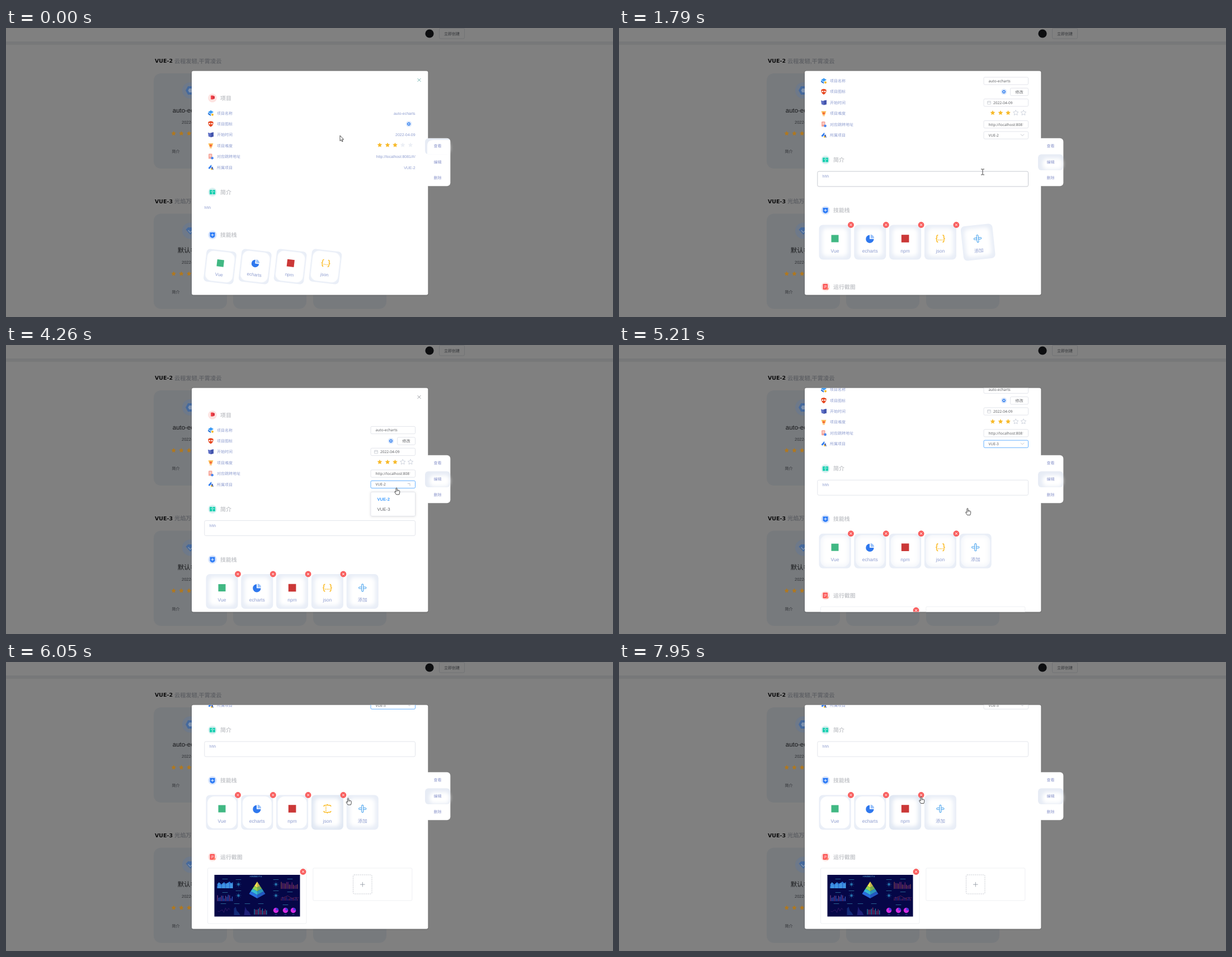
Write an HTML page that moves like this. It is 1085 px wide and 516 px high and loops after 8 s.

```html
<!DOCTYPE html>
<html lang="zh">
<head>
<meta charset="utf-8">
<title>项目详情</title>
<style>
html, body { margin: 0; width: 100%; height: 100%; overflow: hidden; background: #808080; }
svg { display: block; width: 1085px; height: 516px; }
text { font-family: "Liberation Sans", "Noto Sans CJK SC", sans-serif; text-rendering: geometricPrecision; white-space: pre; }
.ui { font-family: "Noto Sans", "Noto Sans CJK SC", sans-serif; }
.bold { font-weight: bold; }
.wide { font-family: "DejaVu Sans", "Noto Sans CJK SC", sans-serif; font-weight: bold; }
</style>
</head>
<body>
<svg id="stage" viewBox="0 0 1085 516"></svg>
<script>
const BLUE = '#8d9ccf', GOLD = '#f7ba2a', LINE = '#dcdfe6', GREY = '#606266', FOCUS = '#409eff';
const ROWS = [152, 171.3, 190.8, 210, 229.6, 249];
const STARS = [668, 682, 695.5, 709.2, 723];

// Drawing helpers
const rect = (x, y, w, h, fill, r = 0, more = '') =>
  `<rect x="${x}" y="${y}" width="${w}" height="${h}" rx="${r}" fill="${fill}" ${more}/>`;
const frame = (x, y, w, h, r = 2, more = '') => rect(x, y, w, h, '#fff', r, `stroke="${LINE}" stroke-width=".8" ${more}`);
const disc = (x, y, r, fill) => `<circle cx="${x}" cy="${y}" r="${r}" fill="${fill}"/>`;
const path = (d, fill, more = '') => `<path d="${d}" fill="${fill}" ${more}/>`;
const line = (d, color, w = 1, more = '') => path(d, 'none', `stroke="${color}" stroke-width="${w}" ${more}`);
const text = (x, y, str, size, fill, more = '') =>
  `<text x="${x}" y="${y + size * .37}" font-size="${size}" fill="${fill}" ${more}>${str}</text>`;
const group = (body, more = '') => `<g ${more}>${body}</g>`;
const at = (x, y, body) => group(body, `transform="translate(${x} ${y})"`);
const MID = 'text-anchor="middle"', END = 'text-anchor="end"';

function star(x, y, r, fill, more = '') {
  const pts = Array.from({ length: 10 }, (_, i) => {
    const a = i * Math.PI / 5, q = i % 2 ? r * .48 : r;
    return `${(x + q * Math.sin(a)).toFixed(2)},${(y - q * Math.cos(a)).toFixed(2)}`;
  });
  return `<polygon points="${pts.join(' ')}" fill="${fill}" stroke-linejoin="round" ${more}/>`;
}
const badge = (x, y) => disc(x, y, 5.4, '#f95d5d') +
  line(`M${x - 2} ${y - 2}l4 4m0-4l-4 4`, '#fff', 1);
const hexagon = (r, fill) => path(`M${-r} 0L${-r / 2} ${-r * .87}H${r / 2}L${r} 0L${r / 2} ${r * .87}H${-r / 2}Z`, fill);

// Dimmed page behind the dialog
function pageCard(x, y, title, icon) {
  let s = rect(x, y, 131, 170, '#777a7d', 13);
  if (!title) return s;
  s += disc(x + 65.5, y + 30.5, 14.5, '#6e7989') + at(x + 65.5, y + 30.5, icon);
  s += text(x + 65.5, y + 65.5, title, 11.4, '#17181a', MID);
  s += text(x + 50, y + 87, '2022-04-09', 7.5, '#303236');
  for (let i = 0; i < 5; i++) s += star(x + 35.7 + i * 13.7, y + 107.3, 4.5, i < 3 ? '#b0781f' : '#75777a');
  return s + text(x + 32.5, y + 139.5, '简介', 7, '#303236');
}
function page() {
  const gem = path('M-8 -2L-4 -6H4L8 -2L0 7Z', '#45699c') + line('M-4 -1L0 3L4 -1', '#8797ac', 1.3);
  const cube = hexagon(8.5, '#45699c') + hexagon(4, '#7f92ad');
  return rect(0, 0, 1085, 516, '#808080') + rect(0, 24, 1085, 6, '#777879') +
    disc(757, 10, 7.6, '#0d0e10') +
    rect(774.5, .5, 45, 18.5, '#808080', 2, 'stroke="#6e7073" stroke-width=".8"') +
    text(797, 10.2, '立即创建', 7, '#303236', MID) +
    text(266, 58.8, 'VUE-2', 9.5, '#0c0c0d', 'class="wide"') +
    text(301, 58.8, '云程发轫,干霄凌云', 10.2, '#606266', 'class="bold"') +
    text(266, 309.2, 'VUE-3', 9.5, '#0c0c0d', 'class="wide"') +
    text(301, 309.2, '光焰万丈', 10.2, '#606266', 'class="bold"') +
    pageCard(264, 81, 'auto-echarts', cube) + pageCard(264, 331.5, '默认名称', gem) +
    pageCard(406, 331.5) + pageCard(549, 331.5);
}

// Dialog parts
const head = (y, label, tint, icon) => disc(369, y, 7.8, tint) + at(369, y, icon) +
  text(383, y, label, 9.9, '#c6c8cc', 'class="bold"');
const heads = {
  project: rect(-3, -4.5, 5, 7, '#f5484e', 1) + rect(0, -3.5, 4, 5, '#d9333f', .8),
  intro: rect(-5, -4, 10, 8, '#18cfb0', 1) + line('M0 -4V4M-3 -1H-1.5M1.5 -1H3.5', '#fff', .8),
  skill: path('M-4.5 -4.5H4.5V2.5Q3 5 0 5.4Q-3 5 -4.5 2.5Z', '#2f7df6') + line('M-2.5 0H2.5M0 -2.5V2.5', '#fff', .9),
  shots: rect(-4.5, -5, 8.5, 10, '#fb4f4f', 1.2) + line('M-2.5 -2H2.5M-2.5 0H2.5M-2.5 2H0', '#fff', .8) + disc(3.5, 3.5, 2, '#ff8a70')
};
const rowIcons = [
  path('M-5 -1.5L0 -5L5 -2L0 1.2Z', '#3f9df5') + path('M-5 -.5L0 2.2V5L-5 1.8Z', '#2272d8') + disc(3, 2.8, 2, GOLD),
  path('M-4.5 -3.5Q0 -6.5 4.5 -3.5Q5.5 2 0 5.3Q-5.5 2 -4.5 -3.5Z', '#e6461f') + disc(-2, -.5, 1.4, '#fff') + disc(2, -.5, 1.4, '#fff'),
  path('M-5 -4L-1 -3L0 -3.6L5 -4.5V3L0 4.2L-4 3Z', '#5f70c5') + path('M0 -3.6L5 -4.5V3L0 4.2Z', '#4556ad'),
  path('M-4.5 -4H4.5L2.5 1H-2.5Z', '#fbc15e') + disc(0, -.2, 3, '#fda64a') + path('M0 -2L1.5 0L0 2L-1.5 0Z', '#ee4b3e') + rect(-2, 3, 4, 1.8, '#f9c97c'),
  rect(-4, -5, 6.5, 9, '#f6a79b', 1.2) + line('M-2.5 -2.5H1M-2.5 -.5H1', '#fff', .8) + disc(2.6, 2.6, 2.3, '#4a87ee'),
  path('M-4.5 1L1 -5L1.5 -1.5L-2.5 3Z', '#2f7df0') + path('M0 1L3.5 -1.5L4.8 4.5L2 3Z', '#3d5fb8') + disc(1.5, 3, 1.4, GOLD)
];
const labels = ['项目名称', '项目图标', '开始时间', '项目难度', '对应跳转地址', '所属项目'];
const chip = x => at(x, 171.3, disc(0, 0, 5.3, '#dbe8fc') + hexagon(3.3, '#4a8ef0') + disc(0, 0, 1.1, '#fff'));

function viewPart() {
  const values = { 0: 'auto-echarts', 2: '2022-04-09', 4: 'http://localhost:8081/#/', 5: 'VUE-2' };
  let s = chip(720);
  for (const i in values) s += text(731.6, ROWS[i], values[i], 6.95, BLUE, END);
  STARS.forEach((x, i) => s += star(x, 209, 4.6, i < 3 ? GOLD : '#eceff5'));
  return s + text(354.5, 320, 'hhh', 7, BLUE) + head(369.5, '技能栈', '#dbe7fd', heads.skill);
}
function editPart() {
  const field = (y, str, x = 660.5) => text(x, y, str, 6.6, GREY, 'class="ui"');
  let s = [0, 2, 4].map(i => frame(652, ROWS[i] - 6.6, 79.5, 13.2)).join('');
  s += frame(652, 242.4, 79.5, 13.2, 2, 'id="select"');
  s += field(152, 'auto-echarts') + field(190.8, '2022-04-09', 669);
  s += group(field(229.6, 'http://localhost:8081/#/'), 'clip-path="url(#url)"');
  s += text(660.5, 249, 'VUE-2', 6.6, GREY, 'class="ui" id="choice"');
  s += line('M-3 -1.5L0 1.5L3 -1.5', '#b4b8c0', .8, 'id="chevron"');
  s += rect(658.5, 188.3, 6, 5.4, 'none', .5, 'stroke="#c0c4cc" stroke-width=".7"') + line('M658.5 190.3h6M660 187.5v1.6M663 187.5v1.6', '#c0c4cc', .7);
  s += chip(688) + frame(699.5, 164.8, 32, 13.4) + text(715.5, 171.6, '修改', 7, GREY, MID);
  STARS.forEach((x, i) => s += star(x, 209, i < 3 ? 4.6 : 4.9, i < 3 ? GOLD : '#fff',
    i < 3 ? '' : `stroke="#c3cad6" stroke-width=".8" id="star${i}"`));
  s += frame(354.8, 313.5, 376.7, 27, 2.5, 'id="area"') + text(363.5, 322, 'hhh', 7, BLUE);
  s += head(383, '技能栈', '#dbe7fd', heads.skill) + head(519.5, '运行截图', '#fde3e1', heads.shots);
  s += frame(360.5, 539.5, 176.5, 99, 2, 'stroke-opacity=".6"') + at(372.5, 551.5, dashboard()) + badge(531, 546);
  s += frame(548.8, 539.5, 177, 58, 2, 'stroke-opacity=".6"');
  s += frame(620.5, 551.5, 33.5, 34, 2, 'style="stroke:#b9bdc6" stroke-dasharray="2 1.4"');
  return s + line('M633 568.7h8.6M637.3 564.4v8.6', '#8c939d', .8);
}

// Layered pyramid: each band has a left and a right face
function pyramid(x, y) {
  const bands = [['#f3e04c', 0, .36], ['#8fd655', .36, .58], ['#36b9d6', .58, .8], ['#2a6ee0', .8, 1]];
  const face = (dir, a, b) => `M${dir * 14.5 * a} ${22 * a}L0 ${30 * a}V${30 * b}L${dir * 14.5 * b} ${22 * b}Z`;
  return at(x, y, bands.map(([c, a, b]) => path(face(-1, a, b), c) + path(face(1, a, b), c, 'opacity=".8"')).join(''));
}

// Small dark chart wall inside the screenshot frame
function dashboard() {
  let seed = 7;
  const rnd = () => (seed = seed * 16807 % 2147483647) / 2147483647;
  const bars = (x, y, n, h, a, b) => Array.from({ length: n }, (_, i) => {
    const v = h * (.35 + .65 * rnd());
    return rect(x + i * 2.4, y - v, 1.2, v, i % 3 ? a : b);
  }).join('');
  const wave = (x, y, w, h, c) => line('M' + Array.from({ length: 9 }, (_, i) => `${x + i * w / 8} ${y - h * rnd()}`).join('L'), c, .5);
  const burst = (x, y) => at(x, y, line('M-5 0H5M0 -5V5M-3.5 -3.5L3.5 3.5M3.5 -3.5L-3.5 3.5', '#1d5596', .6) + disc(0, 0, 2.2, '#2470aa'));
  let s = rect(0, 0, 153, 74.5, '#050747');
  s += text(74, 3, '大数据展示平台', 3.2, '#5fb4e8', MID);
  s += path('M5 24V16L9 14L13 17L17 13L21 16L27 12L30 15L33 13V24Z', '#2a72d4') + bars(5, 24, 12, 11, '#58b4ee', '#3a8ce0');
  s += bars(5, 47, 12, 12, '#3558c0', '#7a4488');
  s += bars(119, 25, 13, 13, '#70286c', '#8a4850') + bars(119, 46, 13, 7, '#352680', '#6a224e') + wave(119, 43, 32, 6, '#a83458');
  for (const x of [43, 110]) s += burst(x, 17) + burst(x, 37);
  s += pyramid(76.5, 12);
  s += wave(6, 70, 22, 12, '#54287c') + path('M35 72V60L38 57L40 64L44 68L46 72Z', '#122a78') + path('M53 72L55 57L58 63L62 66L65 72Z', '#1e2078');
  s += bars(71, 71, 10, 13, '#933560', '#2f8cb0');
  for (const x of [110, 127, 141]) s += disc(x, 63.5, 4.7, '#d52be0') + path(`M${x} 63.5V58.8A4.7 4.7 0 0 1 ${x + 4.7} 63.5Z`, '#4737e0') + rect(x - 2, 70.5, 4, .7, '#3f6fb5');
  for (const [x, y] of [[19, 7], [43, 8], [110, 8], [135, 7], [19, 31], [43, 28], [110, 28], [135, 30], [16, 51], [40, 51], [59, 51], [83, 51], [127, 53]])
    s += rect(x - 5, y, 10, .9, '#27608f', .4);
  return s;
}

// Skill tiles
const skills = [
  ['Vue', rect(-6.5, -6.5, 13, 13, '#41b883')],
  ['echarts', path('M-.8 -6.5V.8H6.8A7.2 7.2 0 1 1 -.8 -6.5Z', '#2f78ee') + path('M.8 -7.3A7 7 0 0 1 7.3 -.8H.8Z', '#9cc3fa')],
  ['npm', rect(-6.8, -6.8, 13.6, 13.6, '#cb3837')],
  ['json', line('M-4 -6.3Q-6.3 -6.3 -6.3 -4V-2Q-6.3 0 -8.3 0Q-6.3 0 -6.3 2V4Q-6.3 6.3 -4 6.3M4 -6.3Q6.3 -6.3 6.3 -4V-2Q6.3 0 8.3 0Q6.3 0 6.3 2V4Q6.3 6.3 4 6.3', '#fbbd2b', 1.6) +
    [-3, 0, 3].map(x => disc(x, 2.5, .9, '#fbbd2b')).join('')],
  ['添加', line('M-1.5 -1.5V-5Q-1.5 -6.6 0 -6.6T1.5 -5V5Q1.5 6.6 0 6.6T-1.5 5V-1.5H-5Q-6.6 -1.5 -6.6 0T-5 1.5H-1.5M1.5 -1.5H5Q6.6 -1.5 6.6 0T5 1.5H1.5', '#4fa6ee', 1.1)]
];
const inset = (x, y, w, h) => rect(x + 5.8, y + 5.8, w - 11.6, h - 11.6, '#fff', 8, 'filter="url(#soft)" class="soft"') +
  rect(x + 2.6, y + 2.6, w - 5.2, h - 5.2, '#fff', 12, 'filter="url(#crisp)" class="crisp"');
const tile = ([name, icon], i) => group(
  rect(-28.5, -31, 57, 62, '#e9eef7', 7, 'class="base"') + inset(-28.5, -31, 57, 62) +
  at(0, -6.5, group(icon, 'class="icon"')) + text(0, 15, name, 8.5, BLUE, MID) +
  (i < 4 ? group(badge(28.5, -31), 'class="badge"') : ''), `id="tile${i}"`);

const menu = () => rect(749, 196.8, 45.3, 85.4, '#fff', 6) +
  group(rect(749, 197, 45, 28.5, '#e7ecf5', 6) +
    rect(757, 204, 36, 20, '#fff', 8, 'filter="url(#soft)" class="soft"') +
    path('M753 225.5V211Q753 200 764 200H794V225.5Z', '#fff', 'filter="url(#crisp)" class="crisp"'), 'id="active"') +
  ['查看', '编辑', '删除'].map((s, i) => text(771.5, 210.8 + i * 28.5, s, 7, '#8a95cb', MID)).join('');

const dropdown = () => frame(652, 262.5, 79.5, 43, 2, 'filter="url(#drop)"') +
  text(663.5, 274.8, 'VUE-2', 7.6, FOCUS, 'class="bold"') + text(663.5, 292.8, 'VUE-3', 7.8, GREY);

const ink = 'stroke="#222" stroke-width=".8" stroke-linejoin="round"';
const cursors = {
  arrow: path('M0 0V9.6L2.2 7.6L3.7 10.9L5.2 10.2L3.8 7H6.6Z', '#fff', ink),
  hand: path('M-1 1.2Q0 -.6 1 1.2V4.6Q2 3.9 3 4.9Q4 4.4 4.6 5.5Q5.6 5.3 5.7 6.6V9.5L4.8 12.5H-.4L-3.2 8.4Q-3.4 6.6 -2.2 7L-1 8.2Z', '#fff', ink) + line('M1 4.6V7M3 5V7', '#222', .6),
  beam: line('M-3 -5H-.8L0 -4.4L.8 -5H3M0 -4.4V4.4M-3 5H-.8L0 4.4L.8 5H3', '#333', .9)
};

const blur = (id, d) => `<filter id="${id}" x="-40%" y="-40%" width="180%" height="180%"><feGaussianBlur stdDeviation="${d}"/></filter>`;
const shadow = (id, d, o) => `<filter id="${id}" x="-20%" y="-20%" width="140%" height="140%"><feDropShadow dx="0" dy=".5" stdDeviation="${d}" flood-opacity="${o}"/></filter>`;

document.getElementById('stage').innerHTML =
  `<defs>${blur('soft', 3.2)}${blur('crisp', .6)}${shadow('drop', 2, .12)}${shadow('lift', .8, .25)}
  <clipPath id="dialog">${rect(332, 76.8, 422.3, 399.6, '#fff', 3)}</clipPath>
  <clipPath id="url">${rect(653, 222, 69.3, 15, '#fff')}</clipPath></defs>` +
  page() + rect(332, 76.8, 422.3, 399.6, '#fff', 3, 'filter="url(#lift)"') +
  group(group(
    line('M735.6 90l5.8 5.8m0-5.8l-5.8 5.8', '#909399', .9, 'id="close"') +
    head(125, '项目', '#fde3e1', heads.project) +
    ROWS.map((y, i) => at(366, y, rowIcons[i]) + text(377, y, labels[i], 7, BLUE)).join('') +
    head(293, '简介', '#d8f1f1', heads.intro) +
    group(viewPart(), 'id="view"') + group(editPart(), 'id="edit"') +
    skills.map(tile).join('') + group(dropdown(), 'id="dropdown"'),
    'id="scroll"'), 'clip-path="url(#dialog)"') +
  menu() + group(Object.entries(cursors).map(([k, s]) => group(s, `id="${k}"`)).join(''), 'id="cursor"');

// Motion
const el = id => document.getElementById(id);
const set = (node, name, value) => node.setAttribute(name, value);
const show = (node, on) => { node.style.display = on ? '' : 'none'; };

function key(t, keys) {
  if (t <= keys[0][0]) return keys[0].slice(1);
  const n = keys.findIndex(k => k[0] > t);
  if (n < 0) return keys[keys.length - 1].slice(1);
  const a = keys[n - 1], b = keys[n], p = (t - a[0]) / (b[0] - a[0]);
  return a.slice(1).map((v, i) => v + (b[i + 1] - v) * p);
}

// Bursts of evenly spaced picture changes: first, last, count
const bursts = [[0, 120, 2], [430, 1110, 6], [1400, 1790, 4], [1910, 2300, 3], [2450, 2450, 1], [2730, 3010, 3],
  [3160, 3710, 5], [3840, 4260, 4], [4410, 4670, 3], [4970, 5460, 5], [5590, 5900, 3], [6050, 6050, 1], [6200, 7050, 7], [7170, 7950, 6]];
const ticks = bursts.flatMap(([a, b, n]) => Array.from({ length: n }, (_, i) => n > 1 ? Math.round(a + (b - a) * i / (n - 1)) : a));
const snap = t => ticks.filter(k => k <= t).pop();

const scrollKeys = [[1400, 0], [1660, 42], [1790, 57.5], [1910, 57.5], [2300, 0], [4670, 0], [5460, 135], [5900, 171.5]];
const pointer = [[0, 597, 192], [120, 650, 215], [430, 680, 226], [838, 755, 236], [1110, 769, 240], [1400, 769, 240],
  [1660, 680, 252], [1790, 650, 257], [1910, 649, 290], [2300, 648, 427], [2450, 724, 151], [2730, 704, 180], [2870, 709, 208],
  [3010, 743, 212], [3160, 769, 230], [3300, 766, 236], [3710, 704, 250], [4260, 698, 254.5], [4533, 688, 290], [4670, 688, 290],
  [4970, 640, 291], [5460, 572, 291.5], [5900, 600, 262], [6050, 611.5, 242.5], [6342, 603, 236], [7050, 603, 238], [7326, 600, 240], [7794, 544, 241], [7950, 540, 240]];
const calm = [9000, 9000, 7170, 5590, 5590];

function moveTile(i, t, edit) {
  const node = el('tile' + i), part = c => node.querySelector('.' + c);
  let x = (edit ? 386 : 382.5) + i * 62.8, turn = 0, size = 1;
  if (!edit) [turn, size] = key(t, [[0, 6.5, .945], [120, 4, .96], [838, 0, 1]]);
  if (i === 4) {
    const [dx, r] = key(t, [[1400, 14, -18], [1790, 4.5, -6], [2170, 0, 0]]);
    x += dx + key(t, [[7050, 0], [7170, -10], [7482, -62.8]])[0];
    turn = r;
  }
  const crisp = edit ? key(t, [[4970, 0], [5215, 1], [calm[i], 1], [calm[i] + 310, 0]])[0] : key(t, [[430, 1], [1110, 0]])[0];
  const hover = i === 3 ? t > 5500 : i === 2 && t > 7400;
  show(node, edit || i < 4);
  set(node, 'transform', `translate(${x} ${edit ? 440 : 426}) rotate(${turn}) scale(${size})`);
  set(part('base'), 'fill', hover ? '#e1e8f3' : '#e9eef7');
  set(part('crisp'), 'opacity', crisp);
  if (i < 4) show(part('badge'), edit);
  if (i === 3) {
    set(part('icon'), 'transform', `rotate(${key(t, [[5460, 0], [6050, 90], [6484, 180]])[0]})`);
    set(node, 'opacity', key(t, [[7050, 1], [7170, .5], [7326, 0]])[0]);
  }
}

function update(now) {
  const t = snap(now % 8000), edit = t >= 1400;
  set(el('scroll'), 'transform', `translate(0 ${-key(t, scrollKeys)[0]})`);
  show(el('view'), !edit);
  show(el('edit'), edit);
  set(el('close'), 'stroke', t < 430 ? '#63aaa6' : '#909399');
  skills.forEach((_, i) => moveTile(i, t, edit));

  set(el('active'), 'transform', `translate(0 ${edit ? 28.5 : 0})`);
  set(el('active').querySelector('.crisp'), 'opacity', edit ? 0 : 1);
  set(el('area'), 'stroke', t > 1700 && t < 2100 ? '#b9bdc6' : LINE);
  set(el('star3'), 'fill', t >= 2870 && t < 3160 ? '#c6c9cf' : '#fff');

  set(el('select'), 'stroke', t > 4100 && t < 6900 ? FOCUS : LINE);
  el('choice').textContent = t >= 4670 ? 'VUE-3' : 'VUE-2';
  const open = key(t, [[3980, 0], [4260, 1], [4533, 1], [4670, 0]])[0];
  set(el('dropdown'), 'opacity', open);
  show(el('dropdown'), open > 0);
  const flip = key(t, [[4120, 0], [4260, -135], [4410, -180], [4533, -180], [4670, 0]])[0];
  set(el('chevron'), 'transform', `translate(721 248.5) rotate(${flip})`);

  const [x, y] = key(t, pointer);
  const kind = t < 700 ? 'arrow' : t < 1600 ? 'hand' : t < 2600 ? 'beam' : 'hand';
  set(el('cursor'), 'transform', `translate(${x} ${y})`);
  for (const k in cursors) show(el(k), k === kind);
}

let start;
function loop(now) {
  start ??= now;
  update(now - start);
  requestAnimationFrame(loop);
}
update(0);
requestAnimationFrame(loop);
</script>
</body>
</html>
```
